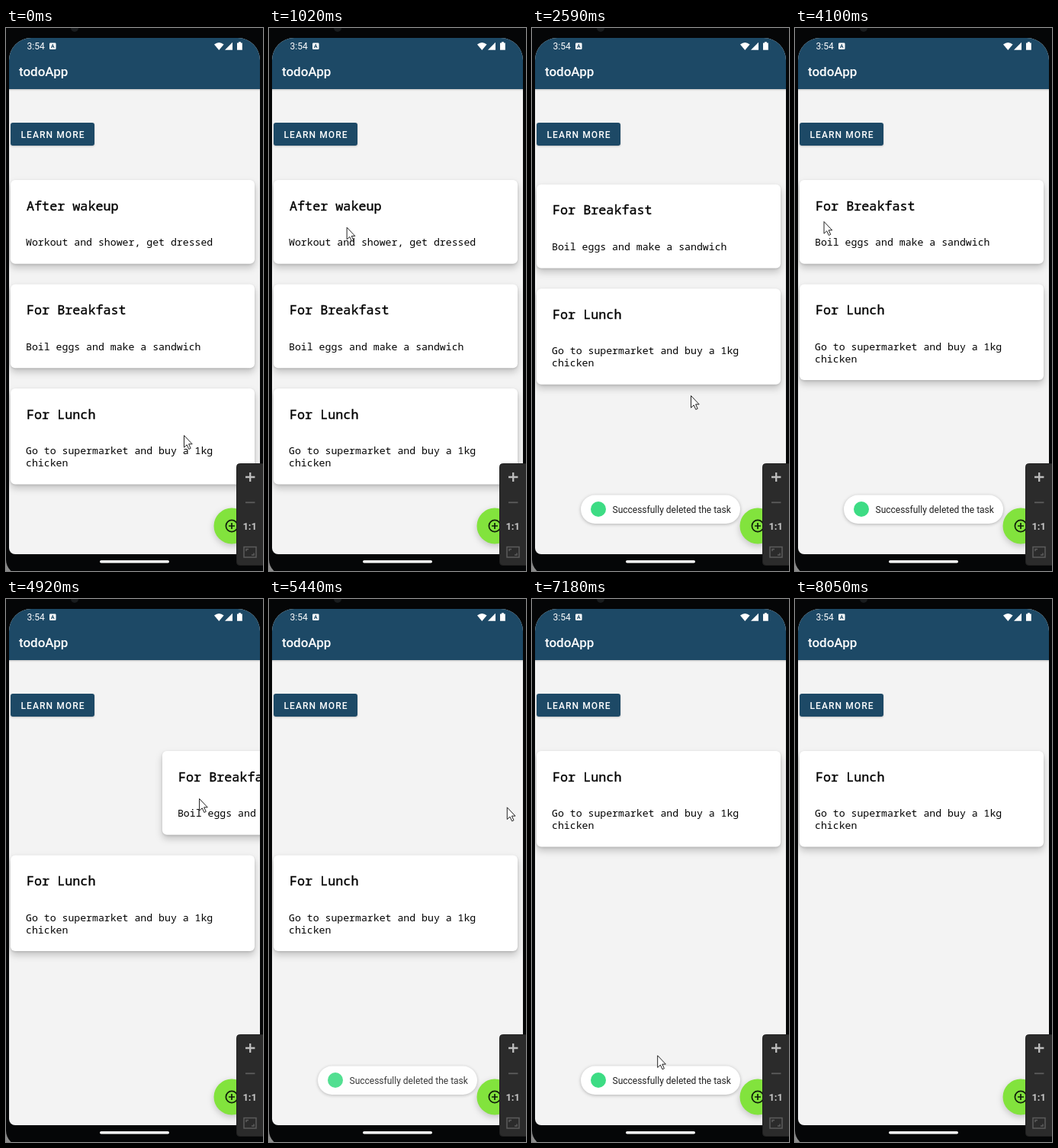
An HTML page for the animation above (8.3 s loop, 337x711 px).

```html
<!DOCTYPE html>
<html lang="en">
<head>
<meta charset="utf-8">
<title>Swipe to delete</title>
<style>
html, body { margin: 0; width: 100%; height: 100%; overflow: hidden; background: #8b8b8b; }
svg { display: block; width: 337px; height: 711px; }
text { font: 12px Roboto, sans-serif; }
.medium { font-weight: 500; fill: #fff; }
.mono { font: 13.2px "Noto Sans Mono", "DejaVu Sans Mono", monospace; }
.heading { font-size: 16.75px; stroke: #000; stroke-width: .35px; }
.card { filter: drop-shadow(0 1px 1.5px #0002) drop-shadow(0 5px 5px #0003); }
.bar { filter: drop-shadow(0 1px 1px #0003); }
.raised { filter: drop-shadow(0 3px 4px #0003); }
.toast { filter: drop-shadow(0 1px 2px #0004); }
</style>
</head>
<body>
<svg viewBox="0 0 337 711">
  <defs>
    <clipPath id="screen"><path d="M4 42a29 29 0 0 1 29-29H304a29 29 0 0 1 29 29V681a8 8 0 0 1-8 8H12a8 8 0 0 1-8-8Z"/></clipPath>
  </defs>
  <rect y="-40" width="345" height="756" rx="20" fill="#050607"/>
  <circle cx="90" cy="0" r="5" fill="#191c1e"/>
  <rect x="123" y="697" width="91" height="3.5" rx="1.75" fill="#fff"/>

  <g clip-path="url(#screen)">
    <path d="M0 0H337V711H0Z" fill="#f3f3f3"/>
    <path class="bar" d="M0 0H337V80H0Z" fill="#1d4966"/>
    <g fill="#fff">
      <text x="27.5" y="28">3:54</text>
      <rect x="57" y="19.5" width="8.5" height="8.5" rx="1.2"/>
      <path d="M273 21.5Q279.3 16.5 285.6 21.5L279.3 29Z"/>
      <path d="M287 28.7L297 18.7V28.7Z"/>
      <path d="M303 19.5H305V18.2H308V19.5H309.8V28.8H303Z"/>
    </g>
    <path d="M59.4 26L61.25 21.4L63.1 26M60 24.7H62.5" fill="none" stroke="#1d4966"/>
    <text class="medium" x="17" y="63" style="font-size:17px">todoApp</text>
    <rect class="bar" x="6" y="124" width="110" height="30" rx="3" fill="#1d4966"/>
    <text class="medium" x="19.5" y="143.7" letter-spacing="1.07">LEARN MORE</text>
    <g id="cards"></g>
    <circle class="raised" cx="296" cy="652" r="23.5" fill="#82e33d"/>
    <g fill="none" stroke="#10200a" stroke-width="1.7">
      <circle cx="296" cy="652" r="7.6"/>
      <path d="M292 652H300M296 648V656"/>
    </g>
    <g id="toast" class="toast">
      <rect x="64" y="611.5" width="209" height="37.5" rx="18.75" fill="#fff"/>
      <circle cx="87" cy="630" r="10" fill="#3ddc84"/>
      <text x="105.5" y="634.5" fill="#202020">Successfully deleted the task</text>
    </g>
  </g>

  <rect x="302.5" y="570.5" width="40" height="133" rx="4" fill="#2b2b2b" stroke="#202020"/>
  <g fill="none" stroke-width="2.3">
    <path d="M314 588H326.4M320.2 582V594" stroke="#bdbdbd"/>
    <path d="M314 621.3H326.4" stroke="#5c5c5c" stroke-width="1.8"/>
    <path d="M312 679.5H328V693H312ZM315 685V682.5H318M325 687.5V690H322" stroke="#5c5c5c" stroke-width="1.5"/>
  </g>
  <text x="319.7" y="657.3" text-anchor="middle" fill="#c6c6c6" style="font-weight:700;font-size:13px">1:1</text>
  <path id="cursor" d="M.5 .5V16.2L4.2 12.8L6.8 18.5L9.2 17.4L6.6 11.8H11.2Z" fill="#fff" stroke="#222"/>
</svg>

<script>
const LOOP = 8300, STEP = 129.4; // the picture refreshes once per STEP
const TOP = 199, PITCH = 136.5;
const $ = id => document.getElementById(id);

const tasks = [
  { title: "After wakeup", lines: ["Workout and shower, get dressed"], swiped: 1564 },
  { title: "For Breakfast", lines: ["Boil eggs and make a sandwich"], swiped: 4614 },
  { title: "For Lunch", lines: ["Go to supermarket and buy a 1kg", "chicken"], swiped: Infinity },
];
$("cards").innerHTML = tasks.map(({ title, lines }) => `
  <g><rect class="card" x="6" width="320" height="${94 + 15.8 * lines.length}" rx="6" fill="#fff"/>
  <text class="mono heading" x="27" y="39.5">${title}</text>
  ${lines.map((line, i) => `<text class="mono" x="26" y="${86 + 16 * i}">${line}</text>`).join("")}</g>`).join("");
const cards = [...$("cards").children];

const mix = (a, b, u) => a + (b - a) * u;
const progress = (time, start, length) => Math.min(1, Math.max(0, (time - start) / length));
const ease = (time, start, length) => {
  const u = progress(time, start, length);
  return u * u * (3 - 2 * u);
};

// Places the pointer passes: time, x, y.
const stops = [
  [0, 233, 533], [750, 102, 261], [1560, 100, 259], [1811, 320, 251], [2200, 325, 265],
  [2588, 208, 481], [2720, 185, 536], [3100, 147, 335], [3430, 150, 256], [4010, 37.5, 253],
  [4600, 50, 255], [4917, 253, 261], [5170, 318, 270], [5850, 302, 276], [6080, 293, 302],
  [6280, 274, 332], [6670, 213, 666],
];
const CIRCLING = 6670, LEAVING = 7440, GONE = 8000;

function pointerAt(time) {
  if (time < CIRCLING) {
    const next = stops.findIndex(stop => stop[0] > time);
    const [start, x, y] = stops[next - 1], [end, toX, toY] = stops[next];
    const u = progress(time, start, end - start);
    return [mix(x, toX, u), mix(y, toY, u)];
  }
  // Round the toast, then away to the lower right.
  const angle = mix(.9, -Math.PI, progress(time, CIRCLING, LEAVING - CIRCLING));
  const exit = progress(time, LEAVING, GONE - LEAVING);
  return [mix(152 + 98 * Math.cos(angle), 295, exit), mix(637 + 40 * Math.sin(angle), 686, exit)];
}

const place = (node, x, y) => node.setAttribute("transform", `translate(${x} ${y})`);

function draw() {
  const now = performance.now() % LOOP;
  const time = now - now % STEP;
  let closed = 0, toast = 0;
  tasks.forEach(({ swiped }, i) => {
    place(cards[i], 345 * ease(time, swiped, 550), TOP + PITCH * (i - closed));
    closed += ease(time, swiped + 840, 210);
    toast += ease(time, swiped + 640, 230) - ease(time, swiped + 2750, 300);
  });
  $("toast").style.opacity = toast;
  place($("cursor"), ...pointerAt(time));
  $("cursor").style.display = time < GONE ? "" : "none";
  requestAnimationFrame(draw);
}
draw();
</script>
</body>
</html>
```
